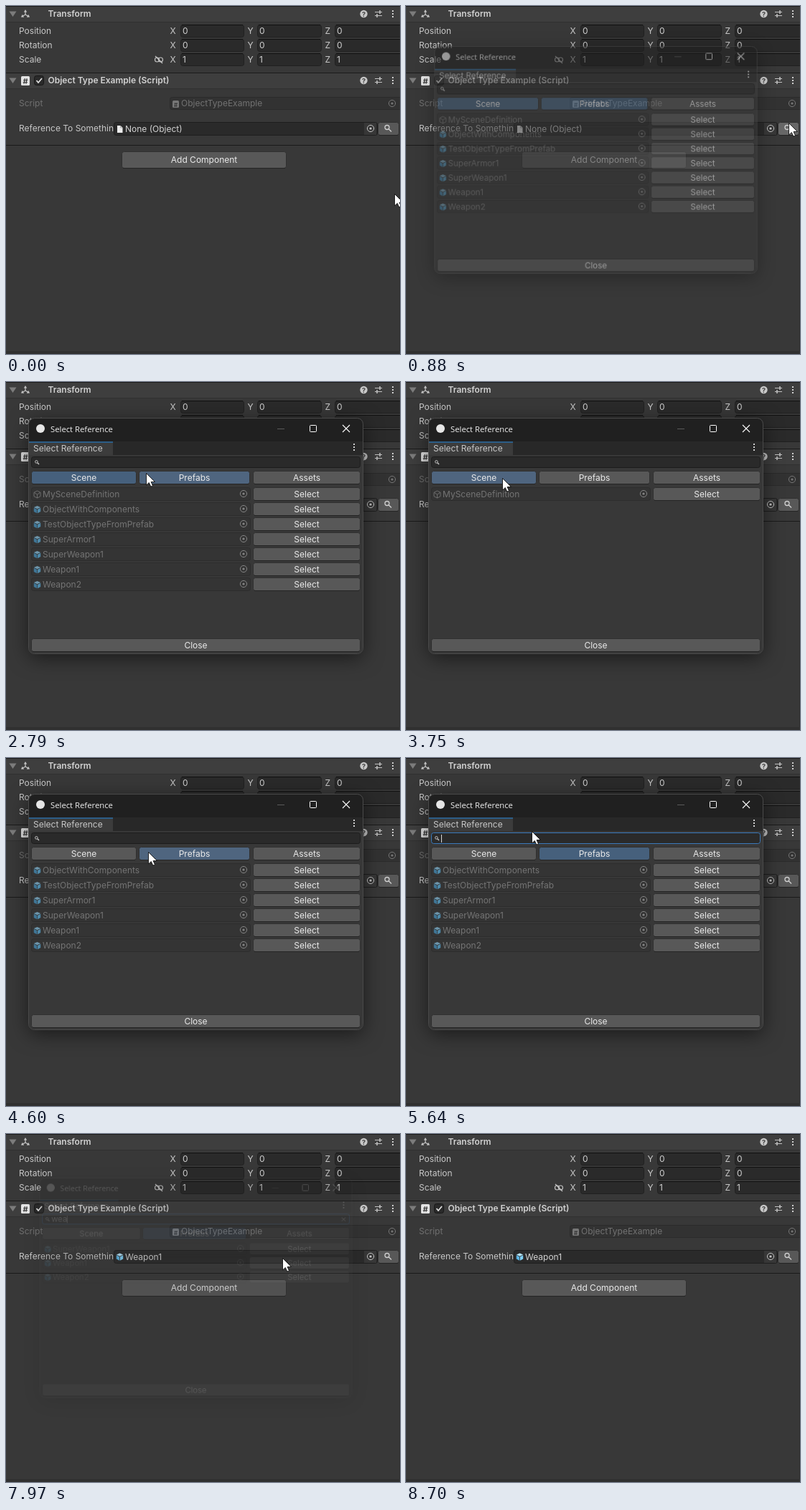
These frames come from a looping animation (549x486 px, 9.54 s). An HTML page with a canvas:

```html
<!DOCTYPE html>
<html>
<head>
<meta charset="utf-8">
<style>
html, body { margin: 0; width: 549px; height: 486px; overflow: hidden; background: #383838; }
canvas { display: block; }
</style>
</head>
<body>
<canvas id="stage" width="549" height="486"></canvas>
<script>
const LOOP = 9540, OPEN = 820, PICK = 7870, FADE = 110;
const stage = document.getElementById('stage').getContext('2d');
const layerCanvas = document.createElement('canvas');
layerCanvas.width = 549;
layerCanvas.height = 486;
const layer = layerCanvas.getContext('2d');
let c = stage, pointer = [0, 0], hoverOn = true;

// Pointer path: time, x, y
const path = [
  [30, 541, 262], [410, 533, 163], [1620, 533, 163], [1650, 530, 164],
  [2260, 140, 133], [2630, 140, 133], [2790, 195, 127], [2930, 222, 117],
  [3150, 210, 129], [3450, 204, 131], [3590, 204, 131], [3750, 134, 134],
  [4100, 134, 134], [4400, 198, 131], [4620, 198, 131], [5000, 171, 107],
  [5030, 171, 107], [5070, 172, 107], [5270, 172, 107], [5390, 172, 94],
  [5500, 172, 99], [5639, 172, 99], [5640, 175, 102], [7380, 175, 102],
  [7410, 177, 103], [7780, 385, 173], [8300, 385, 173], [8700, 400, 490]
];
const items = ['MySceneDefinition', 'ObjectWithComponents', 'TestObjectTypeFromPrefab',
  'SuperArmor1', 'SuperWeapon1', 'Weapon1', 'Weapon2'];

const clamp = v => Math.max(0, Math.min(1, v));

function pointerAt(t) {
  const i = path.findIndex(k => k[0] > t);
  if (i < 0) return path[path.length - 1].slice(1);
  if (!i) return path[0].slice(1);
  const [t0, x0, y0] = path[i - 1], [t1, x1, y1] = path[i];
  const u = (t - t0) / (t1 - t0), e = u * u * (3 - 2 * u);
  return [x0 + (x1 - x0) * e, y0 + (y1 - y0) * e];
}

function over(x, y, w, h) {
  const [px, py] = pointer;
  return hoverOn && px >= x && px < x + w && py >= y && py < y + h;
}

function rect(x, y, w, h, color) {
  c.fillStyle = color;
  c.fillRect(x, y, w, h);
}

function box(x, y, w, h, fill, border, r = 3) {
  c.beginPath();
  c.roundRect(x + .5, y + .5, w - 1, h - 1, r);
  c.fillStyle = fill;
  c.fill();
  c.strokeStyle = border;
  c.lineWidth = 1;
  c.stroke();
}

function text(s, x, y, color = '#c8c8c8', align = 'left', font = '12px Inter, sans-serif') {
  c.font = font;
  c.textAlign = align;
  c.fillStyle = color;
  c.fillText(s, x, y + 4.3);
}

function line(points, color, width = 1) {
  c.beginPath();
  points.forEach(p => c.lineTo(...p));
  c.strokeStyle = color;
  c.lineWidth = width;
  c.stroke();
}

function poly(points, color) {
  c.beginPath();
  points.forEach(p => c.lineTo(...p));
  c.closePath();
  c.fillStyle = color;
  c.fill();
}

function disc(x, y, r, color) {
  c.beginPath();
  c.arc(x, y, r, 0, 7);
  c.fillStyle = color;
  c.fill();
}

function ring(x, y, r, color, width = 1) {
  c.beginPath();
  c.arc(x, y, r, 0, 7);
  c.strokeStyle = color;
  c.lineWidth = width;
  c.stroke();
}

function button(label, x, y, w, h, on) {
  const hot = over(x, y, w, h);
  box(x, y, w, h, on ? (hot ? '#4f657f' : '#46607c') : hot ? '#676767' : '#585858', '#303030');
  rect(x + 2, y + h - 1, w - 4, 1, '#242424');
  text(label, x + w / 2, y + h / 2, '#eaeaea', 'center');
}

function picker(x, y, color) {
  ring(x, y, 4.6, color);
  disc(x, y, 1.6, color);
}

function magnifier(x, y, s, color) {
  ring(x - s * .2, y - s * .2, s * .6, color, s > 4 ? 1.3 : 1);
  line([[x + s * .25, y + s * .25], [x + s, y + s]], color, 1.4);
}

function kebab(x, y) {
  for (const d of [-4, 0, 4]) rect(x - 1, y + d - 1, 2, 2, '#d0d0d0');
}

function cube(x, y, top, side, front) {
  poly([[x, y - 5], [x + 4.7, y - 3], [x, y - .8], [x - 4.7, y - 3]], top);
  poly([[x - 4.7, y - 2.2], [x - .4, y], [x - .4, y + 5.2], [x - 4.7, y + 3]], side);
  poly([[x + 4.7, y - 2.2], [x + .4, y], [x + .4, y + 5.2], [x + 4.7, y + 3]], front);
}

function wireCube(x, y, color) {
  line([[x, y - 5], [x + 4.5, y - 2.7], [x + 4.5, y + 2.7], [x, y + 5], [x - 4.5, y + 2.7],
    [x - 4.5, y - 2.7], [x, y - 5]], color);
  line([[x - 4.5, y - 2.7], [x, y], [x + 4.5, y - 2.7]], color);
  line([[x, y], [x, y + 5]], color);
}

function hashIcon(x, y, w, fill, ink) {
  c.beginPath();
  c.roundRect(x, y, w, w + 1, 1.5);
  c.fillStyle = fill;
  c.fill();
  text('#', x + w / 2, y + w / 2 + .3, ink, 'center', `600 ${w - 1}px Inter, sans-serif`);
}

function header(y, title) {
  rect(0, y, 549, 1, '#1a1a1a');
  rect(0, y + 1, 549, 21, '#3e3e3e');
  rect(0, y + 22, 549, 1, '#303030');
  const m = y + 11;
  poly([[4.5, m - 3.5], [14.5, m - 3.5], [9.5, m + 4]], '#7c7c7c');
  text(title, 58.5, m, '#d2d2d2', 'left', '600 12px Inter, sans-serif');
  disc(498.5, m, 5.2, '#c8c8c8');
  text('?', 498.5, m - .8, '#3e3e3e', 'center', 'bold 9px Inter, sans-serif');
  line([[514, m - 2.5], [524, m - 2.5]], '#c4c4c4');
  line([[514, m + 2.5], [524, m + 2.5]], '#c4c4c4');
  line([[521, m - 5], [521, m]], '#c4c4c4', 1.5);
  line([[517, m], [517, m + 5]], '#c4c4c4', 1.5);
  kebab(539, m);
}

function axesIcon(x, y) {
  for (const a of [-90, 30, 150]) {
    c.save();
    c.translate(x, y);
    c.rotate(a * Math.PI / 180);
    line([[0, 0], [5, 0]], '#c4c4c4', 1.3);
    poly([[3.5, -2.2], [7, 0], [3.5, 2.2]], '#c4c4c4');
    c.restore();
  }
}

function inspector(picked) {
  rect(0, 0, 549, 486, '#383838');
  rect(548, 195, 1, 288, '#2b2b2b');
  rect(0, 482, 549, 4, '#303030');
  header(0, 'Transform');
  axesIcon(27, 12);
  ['Position', 'Rotation', 'Scale'].forEach((name, i) => {
    const y = 35 + 20 * i;
    text(name, 18, y);
    [['X', 228.5, 243, 89], ['Y', 336.5, 350, 90], ['Z', 444.5, 458, 95]].forEach(([axis, x, fx, w]) => {
      text(axis, x, y);
      box(fx, y - 9, w, 18, '#2a2a2a', '#202020');
      rect(fx + 2, y - 9, w - 4, 1, '#111');
      text(i < 2 ? '0' : '1', fx + 3, y, '#d2d2d2');
    });
  });
  c.beginPath();
  c.roundRect(207.5, 72, 6, 6, 3);
  c.roundRect(212.5, 72, 6, 6, 3);
  c.strokeStyle = '#c0c0c0';
  c.lineWidth = 1.2;
  c.stroke();
  line([[208, 70], [218, 80]], '#c8c8c8', 1.2);

  header(93, 'Object Type Example (Script)');
  hashIcon(21, 98, 12, '#e4e4e4', '#333');
  box(39, 97, 14, 14, '#2a2a2a', '#171717');
  line([[42.5, 104], [45, 107], [50, 101]], '#e4e4e4', 1.7);
  text('Script', 18, 136, '#707070');
  box(228, 127, 325, 18, '#323232', '#2b2b2b');
  hashIcon(232, 132, 9, '#767676', '#323232');
  text('ObjectTypeExample', 244, 136, '#727272');
  picker(538, 136, '#767676');

  c.save();
  c.beginPath();
  c.rect(0, 160, 150, 24);
  c.clip();
  text('Reference To Something', 18, 171);
  c.restore();
  box(150, 162, 368, 19, '#2a2a2a', over(150, 162, 368, 19) ? '#656565' : '#1e1e1e');
  rect(499, 163, 17, 17, '#373737');
  picker(508, 171, '#c4c4c4');
  if (picked) cube(158.5, 171.5, '#b4e4fa', '#5bb4e4', '#7fd0f7');
  else {
    poly([[155, 167], [159.5, 167], [162.5, 170], [162.5, 177], [155, 177]], '#ececec');
    line([[159.5, 167], [159.5, 170], [162.5, 170]], '#999', .8);
  }
  text(picked ? 'Weapon1' : 'None (Object)', 166, 171.5, '#d2d2d2');
  button('', 518, 162, 30, 19);
  magnifier(532, 170.5, 5, '#cfcfcf');

  rect(0, 194, 549, 1, '#1a1a1a');
  button('Add Component', 161, 203, 230, 24);
}

function rowsAt(scene, prefabs, query) {
  return items.filter((name, i) =>
    (scene === prefabs || (i ? prefabs : scene)) && name.toLowerCase().includes(query));
}

function dialog(t) {
  const scene = t < 4080, prefabs = t < 3250 || t >= 4500;
  const query = 'wea'.slice(0, (t >= 6510) + (t >= 6590) + (t >= 6680));
  const focused = t >= 5270;

  c.clearRect(0, 0, 549, 486);
  c.save();
  c.shadowColor = 'rgba(0,0,0,.55)';
  c.shadowBlur = 28;
  c.shadowOffsetY = 6;
  c.beginPath();
  c.roundRect(32, 51, 465, 328, 8);
  c.fillStyle = '#383838';
  c.fill();
  c.restore();

  c.save();
  c.beginPath();
  c.roundRect(32, 51, 465, 328, 8);
  c.clip();
  rect(32, 51, 465, 32, '#202020');
  rect(32, 83, 465, 19, '#282828');
  rect(32, 83, 117, 19, '#3c3c3c');
  rect(32, 83, 117, 2, '#2c5d87');
  c.restore();
  c.beginPath();
  c.roundRect(31.5, 50.5, 466, 329, 8);
  c.strokeStyle = '#4a4a4a';
  c.lineWidth = 1;
  c.stroke();

  disc(48, 65, 6, '#e6e6e6');
  text('Select Reference', 62, 65.5, '#f0f0f0', 'left', '11.3px "Open Sans", sans-serif');
  line([[378, 65.5], [388, 65.5]], '#5a5a5a');
  c.beginPath();
  c.roundRect(423.5, 60.5, 9, 9, 1);
  c.strokeStyle = '#fff';
  c.stroke();
  line([[469, 60], [479, 70]], '#fff', 1.1);
  line([[479, 60], [469, 70]], '#fff', 1.1);
  text('Select Reference', 38, 93);
  kebab(485, 91);

  box(35, 104, 459, 16, '#2a2a2a', focused ? '#3a79bb' : '#1c1c1c');
  magnifier(43, 112, 3, '#c4c4c4');
  text(query, 49, 112, '#d2d2d2');
  if (focused) rect(Math.round(49 + c.measureText(query).width), 107, 1, 11, '#d8d8d8');
  if (query) {
    line([[482, 109.5], [488, 115]], '#c4c4c4');
    line([[488, 109.5], [482, 115]], '#c4c4c4');
  }

  button('Scene', 35, 124, 147, 19, scene);
  button('Prefabs', 185, 124, 155, 19, prefabs);
  button('Assets', 344, 124, 150, 19);
  rowsAt(scene, prefabs, query).forEach((name, i) => {
    const y = 156.5 + 21 * i;
    box(35, y - 9.5, 306, 19, '#343434', '#2d2d2d');
    if (name === items[0]) wireCube(43.5, y + .5, '#6c6c6c');
    else cube(43.5, y + .5, '#6c95ab', '#3f7596', '#4e89a9');
    text(name, 51, y, '#747474');
    picker(331, y - .5, '#858585');
    button('Select', 344, y - 9.5, 150, 19);
  });
  button('Close', 35, 358, 459, 19);
}

function drawPointer(inField) {
  const [x, y] = pointer;
  if (inField) {
    line([[x - 3, y - 8], [x + 3, y - 8]], '#e0e0e0');
    line([[x, y - 8], [x, y + 8]], '#e0e0e0');
    line([[x - 3, y + 8], [x + 3, y + 8]], '#e0e0e0');
    return;
  }
  const arrow = [[0, 0], [0, 16.5], [3.8, 13], [6.3, 18.6], [9, 17.4], [6.6, 12], [12, 12]]
    .map(([dx, dy]) => [x + dx + .5, y + dy + .5]);
  poly(arrow, '#fff');
  line([...arrow, arrow[0]], '#111', .9);
}

function draw(now) {
  const t = now % LOOP;
  pointer = pointerAt(t);
  const shown = clamp((t - OPEN) / FADE) * clamp(1 - (t - PICK - 10) / FADE);
  const inDialog = shown > 0 && pointer[0] < 497;

  c = stage;
  hoverOn = !inDialog;
  inspector(t >= PICK);
  if (shown > 0) {
    c = layer;
    hoverOn = inDialog;
    dialog(t);
    c = stage;
    const s = .92 + .08 * shown;
    c.save();
    c.globalAlpha = shown;
    c.translate(264.5, 215);
    c.scale(s, s);
    c.drawImage(layerCanvas, -264.5, -215);
    c.restore();
  }
  if (t < 8690) drawPointer(inDialog && over(35, 104, 459, 16));
}

const start = performance.now();
function tick() {
  draw(performance.now() - start);
  requestAnimationFrame(tick);
}
tick();
</script>
</body>
</html>
```
